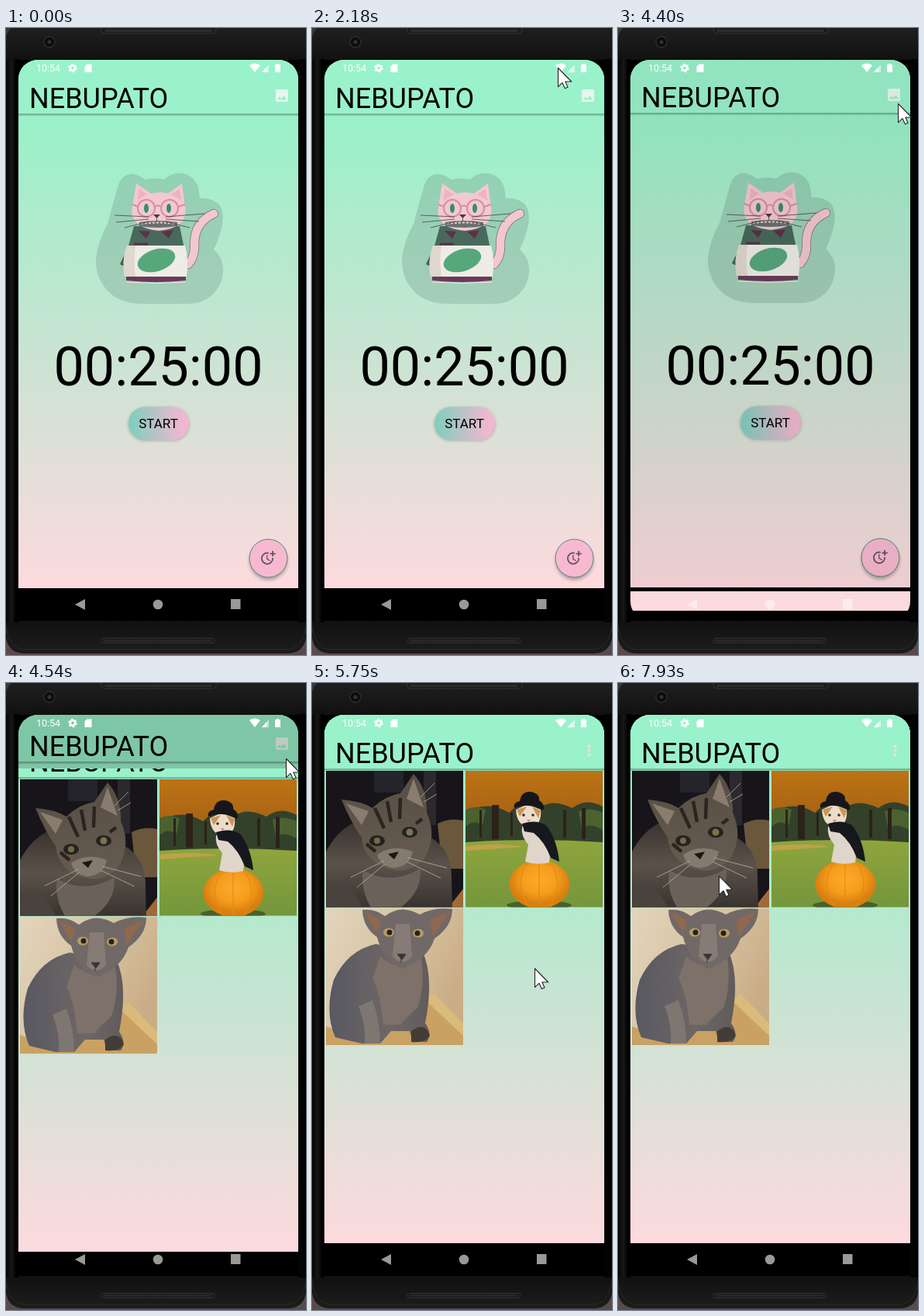
These frames come from a looping animation (387 px wide and 807 px high, 8000 ms). An HTML page:

```html
<!DOCTYPE html>
<html lang="en">
<head>
<meta charset="utf-8">
<title>Focus timer</title>
<style>
html, body { margin: 0; width: 100%; height: 100%; overflow: hidden; background: #141414; }
svg { display: block; }
text { font-family: Roboto, "Liberation Sans", sans-serif; }
</style>
</head>
<body>
<svg width="387" height="807" viewBox="0 0 387 807">
<defs>
  <linearGradient id="mint" gradientUnits="userSpaceOnUse" x1="0" y1="100" x2="0" y2="721">
    <stop offset="0" stop-color="#97f2c8"/><stop offset=".5" stop-color="#c8e4d2"/><stop offset="1" stop-color="#fddade"/>
  </linearGradient>
  <linearGradient id="pill"><stop offset=".05" stop-color="#84cebe"/><stop offset=".9" stop-color="#f2b7cf"/></linearGradient>
  <linearGradient id="shell" x2="0" y2="1"><stop offset="0" stop-color="#1f1f1f"/><stop offset=".05" stop-color="#111"/><stop offset=".95" stop-color="#111"/><stop offset="1" stop-color="#1d1d1d"/></linearGradient>
  <linearGradient id="side"><stop offset="0" stop-color="#050505"/><stop offset=".45" stop-color="#171717"/><stop offset=".8" stop-color="#000"/></linearGradient>
  <linearGradient id="fur" x2="0" y2="1"><stop offset="0" stop-color="#3a332e"/><stop offset=".5" stop-color="#5a524a"/><stop offset="1" stop-color="#39332f"/></linearGradient>
  <linearGradient id="mask" x2="0" y2="1"><stop offset="0" stop-color="#574d43"/><stop offset="1" stop-color="#675c51"/></linearGradient>
  <linearGradient id="wall" x2="1" y2=".5"><stop offset="0" stop-color="#e2d5be"/><stop offset=".6" stop-color="#d6c09e"/><stop offset="1" stop-color="#caad87"/></linearGradient>
  <linearGradient id="coat"><stop offset="0" stop-color="#595861"/><stop offset=".6" stop-color="#6d6665"/><stop offset="1" stop-color="#625b5b"/></linearGradient>
  <linearGradient id="leaves" x2="0" y2="1"><stop offset="0" stop-color="#bd7314"/><stop offset="1" stop-color="#a96414"/></linearGradient>
  <linearGradient id="grass" x2="0" y2="1"><stop offset="0" stop-color="#8fa53d"/><stop offset="1" stop-color="#74963c"/></linearGradient>
  <radialGradient id="squash" cy=".4"><stop offset="0" stop-color="#fcaa2c"/><stop offset=".6" stop-color="#f59c1c"/><stop offset="1" stop-color="#d97f10"/></radialGradient>
  <filter id="soft" x="-30%" y="-30%" width="160%" height="160%"><feGaussianBlur stdDeviation="2"/></filter>
  <clipPath id="screen"><rect x="16" y="41" width="361" height="722" rx="25"/></clipPath>
  <clipPath id="reveal"><rect id="window" x="16" y="41" width="361" height="722"/></clipPath>
  <g id="base">
    <path d="M16 30H377V721H16z" fill="url(#mint)"/>
    <path d="M16 30H377V111H16z" fill="#9af2ca"/>
    <path d="M16 111H377" stroke="#6da88f" stroke-width="1.400"/>
    <path d="M16 112.500H377" stroke="#000" stroke-opacity=".1" stroke-width="2"/>
    <text x="30" y="103" font-size="36">NEBUPATO</text>
  </g>
</defs>

<!-- phone body -->
<path d="M0 0H387V807H0z" fill="#594a4c"/>
<path d="M0 0H387V785Q384 804 364 805H23Q3 804 0 785z" fill="url(#shell)"/>
<path d="M0 770Q4 799 25 800H362Q383 799 387 770" fill="none" stroke="#292929"/>
<path d="M0 40H16V765H0z" fill="url(#side)"/>
<path d="M377 40H387V765H377z" fill="#030303"/>
<path d="M16 41H42V67H16zM351 41H377V67H351zM16 737H42V763H16zM351 737H377V763H351z" fill="#000"/>
<path d="M0 0H7Q2 4 0 12z" fill="#3a3a3a"/>
<rect x="123" y="-4" width="148" height="11" rx="4" fill="#1c1c1c" stroke="#343434"/>
<path d="M128 3.500H266" stroke="#3d3d3d" stroke-width="3" stroke-dasharray="1 1"/>
<rect x="123" y="785.500" width="146" height="6" rx="3" fill="#1b1b1b" stroke="#333"/>
<path d="M127 788.500H265" stroke="#3a3a3a" stroke-width="2" stroke-dasharray="1 1"/>
<circle cx="56" cy="18" r="7" fill="#0c0c0c" stroke="#2d2d2d" stroke-width="1.500"/>
<circle cx="56" cy="18" r="2.500" fill="#30323a"/>

<g clip-path="url(#screen)">
  <path d="M16 41H377V763H16z"/>
  <g id="home">
    <use href="#base"/>
    <path transform="translate(345.300 76.300) scale(.889)" fill="#e6f7ee" d="M21 19V5c0-1.100-.9-2-2-2H5c-1.100 0-2 .9-2 2v14c0 1.100.9 2 2 2h14c1.100 0 2-.9 2-2zM8.500 13.500l2.500 3L14.500 12l4.500 6H5z"/>
    <circle id="ripple" cx="356" cy="87" fill="#fff"/>

    <!-- cat -->
    <path d="M144 205Q149 187 164 188Q174 190 179 195Q194 192 204 195Q214 185 228 187Q243 190 248 205L250 219Q264 218 274 226Q282 236 279 253Q276 269 268 285Q281 296 280 314Q278 334 263 346Q252 355 234 355H181Q151 356 135 342Q115 324 116 297Q119 273 131 252Q138 226 144 205z" fill="#5c8474" fill-opacity=".27"/>
    <path d="M235 304Q244 295 243 278Q243 250 268 239" fill="none" stroke="#7c6c70" stroke-width="12" stroke-linecap="round"/>
    <path d="M235 304Q244 295 243 278Q243 250 268 239" fill="none" stroke="#f2c7d0" stroke-width="10.500" stroke-linecap="round"/>
    <path d="M165 255H224L230 284H157z" fill="#48695b"/>
    <path d="M147 304L158 281V310z" fill="#426052"/>
    <path d="M171 261L186 262L181 271zM200 262L216 260L210 271z" fill="#5e304a"/>
    <path d="M165 278H183" stroke="#5e304a" stroke-width="3"/>
    <path d="M168 200L187 213Q198 210 209 213L227 200L231 230Q236 257 197 261Q158 257 163 230z" fill="#f3c8d0"/>
    <path d="M171 207L182 214L170 222zM224 207L213 214L226 222z" fill="#eeb2c0"/>
    <path d="M172 250Q196 246 221 250V255Q196 259 172 255z" fill="#68716e"/>
    <path d="M174 252Q196 249 219 252" stroke="#d5d2cf" stroke-width="2" fill="none" stroke-dasharray="3 2"/>
    <g fill="none" stroke="#d58fa0" stroke-width="2"><circle cx="181" cy="232" r="11"/><circle cx="211" cy="232" r="11"/><path d="M192 230Q196 227 200 230M170 230L163 227M222 230L231 227"/></g>
    <ellipse cx="181" cy="232" rx="3" ry="6" fill="#398c6b"/><ellipse cx="210" cy="232" rx="3" ry="6" fill="#398c6b"/>
    <path d="M190 240H199L194.500 245z" fill="#533642"/>
    <path d="M194.500 244V249M184 243L140 241M184 246L142 250M185 249L153 257M206 243L256 239M206 246L249 249M205 249L237 257" fill="none" stroke="#49414a" stroke-width=".8"/>
    <path d="M156 280H231Q236 298 233 320H153Q149 299 156 280z" fill="#eeece6"/>
    <path d="M156 280H167Q164 300 167 320H153Q149 299 156 280z" fill="#ded8ce"/>
    <ellipse cx="194" cy="299" rx="25" ry="14" transform="rotate(-17 194 299)" fill="#57a77d"/>
    <path d="M155 320H232V325Q194 329 155 325z" fill="#693a58"/>
    <path d="M155 327Q194 330 232 327" fill="none" stroke="#f2e9e9"/>

    <text x="196.500" y="460" font-size="70" text-anchor="middle">00:25:00</text>
    <rect x="158" y="489" width="78" height="42" rx="21" fill="#000" opacity=".25" filter="url(#soft)"/>
    <rect x="158" y="487.500" width="78" height="43" rx="21.500" fill="url(#pill)"/>
    <text x="196.500" y="515" font-size="17" text-anchor="middle">START</text>
    <circle cx="338.500" cy="686" r="24.500" opacity=".28" filter="url(#soft)"/>
    <circle cx="338.500" cy="682.500" r="24.500" fill="#f6b9d0" stroke="#4d8c7b"/>
    <path transform="translate(327.200 671.200) scale(.89)" fill="#66505c" d="M10 8v6l4.700 2.900.8-1.200-4-2.400V8zM17.920 12A7 7 0 1 1 13 6.290V4.230A9 9 0 1 0 19.940 12zM20 5V2h-2v3h-3v2h3v3h2V7h3V5z"/>
  </g>
  <path id="dim" d="M16 41H377V721H16z" opacity="0"/>

  <g clip-path="url(#reveal)"><g id="gallery">
    <use href="#base"/>
    <g fill="#ecdfdc"><circle cx="357.500" cy="81.500" r="2"/><circle cx="357.500" cy="87" r="2"/><circle cx="357.500" cy="92.500" r="2"/></g>
    <!-- tabby -->
    <svg x="18" y="113" width="177" height="175.500">
      <path d="M0 0H177V176H0z" fill="#17151a"/>
      <path d="M62 0H100V28H62z" fill="#24242a"/><path d="M126 0H142V70H126z" fill="#2b292e"/>
      <path d="M144 68Q160 60 177 64V126H150z" fill="#6b573c"/><path d="M158 176L177 152V176z" fill="#a06a38"/>
      <path d="M0 104Q15 76 38 66L128 82Q164 98 162 142L163 176H0z" fill="url(#fur)"/>
      <path d="M48 128Q84 148 122 126Q124 156 96 176H58Q44 152 48 128z" fill="#6a6158"/>
      <path d="M0 146Q30 138 46 176H0z" fill="#4a423c"/>
      <path d="M20 37Q46 39 60 48Q76 32 96 29L113 4Q131 24 130 54Q144 84 127 113Q106 134 82 126Q50 118 46 86Q32 66 20 37z" fill="url(#mask)"/>
      <path d="M26 42L55 52L46 70zM113 10L126 47L104 36z" fill="#8b7c70"/>
      <path d="M63 48L75 74M79 39L84 66M96 35L95 62M52 94L64 104M124 62L116 68" stroke="#2b2521" stroke-width="4.500"/>
      <path d="M66 108Q86 94 112 104Q108 124 86 125Q70 122 66 108z" fill="#847a6e"/>
      <ellipse cx="66" cy="90" rx="10" ry="7" fill="#26221f"/><ellipse cx="108" cy="79" rx="10" ry="7" fill="#26221f"/>
      <circle cx="66" cy="90" r="4" fill="#6f6d48"/><circle cx="108" cy="79" r="4.500" fill="#77764b"/>
      <path d="M80 107L94 104L88 114z" fill="#1c1717"/>
      <path d="M75 116L32 137M76 120L40 150M106 112L156 125M104 117L148 138M122 34L140 16M126 40L143 30" stroke="#b9b1a8" stroke-width=".8"/>
    </svg>
    <!-- pumpkin -->
    <svg x="198" y="113" width="177" height="175.500">
      <path d="M0 0H177V97H0z" fill="#33412a"/>
      <path d="M0 0H177V46Q155 34 138 48Q114 36 98 46Q72 36 56 54Q32 38 0 52z" fill="url(#leaves)"/>
      <path d="M0 50Q12 44 26 50L22 70Q10 62 0 72zM146 52Q160 46 177 54V76Q160 66 150 74z" fill="#4c6130"/>
      <path d="M34 44H43V88H34zM150 48H155V88H150zM18 50H21V86H18zM126 50H130V86H126zM58 54H61V84H58z" fill="#2b2219"/>
      <path d="M0 92Q90 86 177 92V176H0z" fill="url(#grass)"/>
      <path d="M0 97Q50 92 74 98L0 103z" fill="#bda24a"/>
      <ellipse cx="95" cy="173" rx="42" ry="6" fill="#48602a"/>
      <ellipse cx="95.500" cy="146" rx="39" ry="31" fill="url(#squash)"/>
      <path d="M80 119Q62 146 81 175M110 119Q128 146 109 175M95 117V177" fill="none" stroke="#e28a14" stroke-width="1.200"/>
      <path d="M73 72Q94 57 104 82Q111 104 108 118Q92 122 77 117L81 95Q71 84 73 72z" fill="#dfd5ca"/>
      <path d="M65 50L80 43L97 50Q99 71 82 73Q66 70 65 50z" fill="#ecdcc9"/>
      <path d="M66 50L79 46L70 59zM86 46L97 51L94 61z" fill="#cf9355"/>
      <circle cx="75" cy="57" r="1.800" fill="#34302a"/><circle cx="87" cy="57" r="1.800" fill="#34302a"/><path d="M79 63H84L81.500 66z" fill="#c48680"/>
      <path d="M63 48Q61 41 70 39Q72 26 84 27Q96 29 95 38Q104 44 100 51Q82 40 63 48z" fill="#17171b"/>
      <path d="M73 68Q90 62 104 70Q118 88 121 117L110 112Q102 91 88 80L76 78z" fill="#17171e"/>
    </svg>
    <!-- grey cat -->
    <svg x="18" y="290" width="177" height="176">
      <path d="M0 0H177V176H0z" fill="url(#wall)"/>
      <path d="M0 152L30 162L128 112L177 156V176H0z" fill="#c9a263"/>
      <path d="M128 118L140 110L177 148V164z" fill="#dabb7c"/>
      <path d="M64 46Q28 54 10 92Q-2 134 12 166L46 174H70L84 158H108L112 172H130Q138 162 128 148Q140 88 124 54z" fill="url(#coat)"/>
      <path d="M70 62Q95 84 123 64Q128 100 118 128Q104 140 96 150H74Q70 108 60 90z" fill="#7d7169"/>
      <path d="M42 126Q52 150 50 174H70Q70 145 60 118z" fill="#7e7670"/>
      <path d="M110 158Q128 145 134 164Q128 174 110 172z" fill="#453c37"/>
      <path d="M47 2Q63 0 76 10Q97-6 121 8Q140-2 163 1Q163 23 140 39Q131 66 98 78Q73 65 66 37Q48 25 47 2z" fill="#716967"/>
      <path d="M50 4L71 15L66 32zM160 4L134 15L138 36z" fill="#8f684f"/>
      <path d="M90 20H108L111 62Q98 76 86 62z" fill="#877b76"/>
      <ellipse cx="81" cy="31" rx="7" ry="5.500" fill="#b99c60"/><ellipse cx="119" cy="32" rx="7" ry="5.500" fill="#b99c60"/>
      <circle cx="82" cy="31" r="3.500" fill="#26211f"/><circle cx="118" cy="32" r="3.500" fill="#26211f"/>
      <path d="M92 59H103L98 66zM97 65V70" fill="#3b3433" stroke="#3b3433"/>
    </svg>
  </g></g>

  <!-- system bars -->
  <g fill="#fff">
    <text x="39" y="56" font-size="12.500">10:54</text>
    <circle cx="86" cy="51.500" r="3.200" fill="none" stroke="#fff" stroke-width="2.600"/>
    <circle cx="86" cy="51.500" r="5" fill="none" stroke="#fff" stroke-width="1.600" stroke-dasharray="2.600 2.636"/>
    <path d="M104.500 46.500H110.500V57H101.500V49.500z"/>
    <path d="M314 48Q321 43 328 48L321 57z"/>
    <path d="M339 47V57H330z" opacity=".55"/><path d="M336 50.500V57H330z"/>
    <path d="M349 46H352V47.200H354V57H347V47.200H349z"/>
  </g>
  <g fill="#fffaf2" fill-opacity=".61"><path d="M89 742L102 735V749z"/><circle cx="196" cy="742" r="6.300"/><path d="M290 735H302.500V748H290z"/></g>
</g>

<circle id="press" r="18" fill="#ff0" fill-opacity=".47"/>
<path id="cursor" d="M.5.500V24.700L6 19.400L9.400 26.700L13 25L9.800 18H17.700z" fill="#fff" stroke="#222" stroke-width="1.100" stroke-linejoin="round"/>
</svg>

<script>
const LOOP = 8000;
const el = id => document.getElementById(id);
const set = (id, attrs) => { for (const k in attrs) el(id).setAttribute(k, attrs[k]); };

// start, end, number of steps, evenly spaced points on the way
const moves = [
  [480, 690, 4, [[376, 665], [370, 480], [360, 350]]],
  [1020, 1160, 3, [[362, 300], [368, 210], [375, 138]]],
  [1820, 2570, 12, [[372, 130], [346, 86], [322, 54], [302, 42], [293, 40], [319, 57]]],
  [2650, 3340, 10, [[325, 63], [345, 86], [358, 102], [361, 97]]],
  [5470, 5750, 5, [[358, 120], [325, 250], [287, 367]]],
  [6430, 6920, 8, [[280, 360], [200, 300], [140, 256], [130, 248]]]
];

// time, gallery offset, reveal top, home offset, dimming
const opening = [
  [0, 30, 763, 0, 0],
  [4400, 29, 725, -1, .06],
  [4470, 19, 330, -5, .13],
  [4540, 11, 110, -9, .18],
  [4600, 6, 75, -10, .18],
  [4670, 2, 53, -11, .18],
  [4740, 1, 45, -11, .18],
  [4810, 0, 41, -11, .18]
];

const latest = (rows, t) => rows.filter(r => r[0] <= t).pop();

function along(points, p) {
  const f = p * (points.length - 1);
  const i = Math.min(Math.floor(f), points.length - 2);
  return points[i].map((v, a) => Math.round(v + (points[i + 1][a] - v) * (f - i)));
}

function cursorAt(t) {
  const move = latest(moves, t);
  if (!move) return [-60, -60];
  const [start, end, n, points] = move;
  const k = Math.min(n - 1, Math.floor((t - start) / (end - start) * (n - 1)));
  return along(points, k / (n - 1));
}

function draw(t) {
  const [x, y] = cursorAt(t);
  const [, dy, top, homeDy, dim] = latest(opening, t);
  const pressed = (t >= 3800 && t < 4000) || (t >= 7730 && t < 7930);
  const step = Math.floor((t - 4000) / 65);
  const rippling = step >= 0 && step < 4;

  set("cursor", { transform: `translate(${x} ${y})` });
  set("press", { cx: x, cy: y, visibility: pressed ? "visible" : "hidden" });
  set("ripple", { r: rippling ? 9 + 3 * step : 0, opacity: rippling ? .26 - .04 * step : 0 });
  set("home", { transform: `translate(0 ${homeDy})` });
  set("dim", { opacity: dim });
  set("gallery", { transform: `translate(0 ${dy})` });
  set("window", { y: top, height: 763 - top });
}

const began = performance.now();
function tick() {
  draw((performance.now() - began) % LOOP);
  requestAnimationFrame(tick);
}
tick();
</script>
</body>
</html>
```
